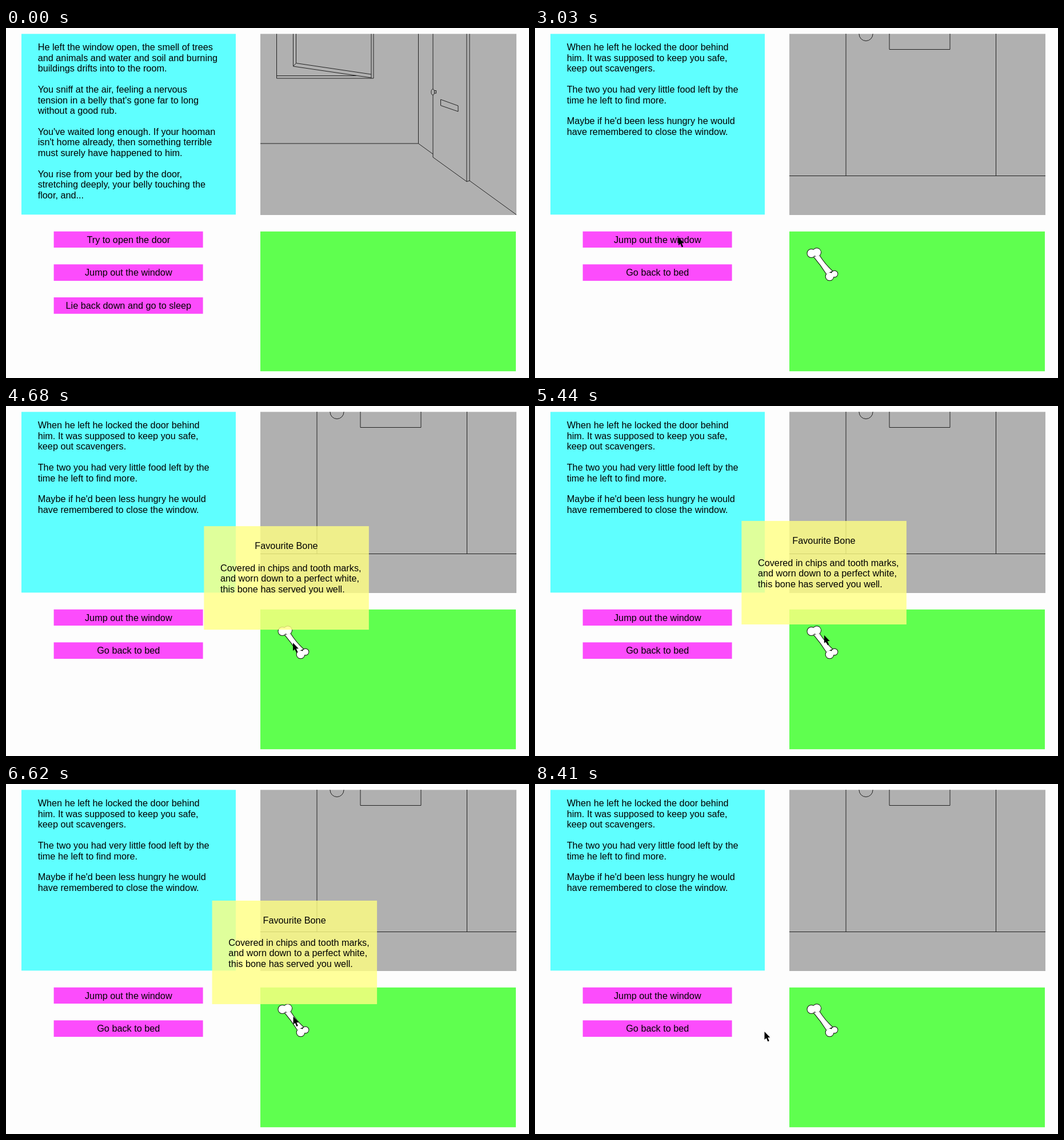
Write an HTML page that moves like this. It is 915 px wide and 612 px high and loops after 9.55 s.

```html
<!DOCTYPE html>
<html lang="en">
<head>
<meta charset="utf-8">
<title>Dog story</title>
<style>
html, body { margin: 0; width: 100%; height: 100%; overflow: hidden; background: #fdfdfd; }
svg { display: block; width: 100vw; height: 100vh; }
text { font: 16.25px "Liberation Sans", Arial, sans-serif; fill: #000; white-space: pre; }
.mid { text-anchor: middle; }
.line { fill: none; stroke: #222; stroke-width: 1; }
.btn { fill: #fc4cfc; }
</style>
</head>
<body>
<svg viewBox="0 0 915 612">
  <defs>
    <clipPath id="view"><rect x="445" y="10.3" width="448" height="316.7"/></clipPath>
    <g id="bone">
      <circle cx="483.5" cy="394" r="7"/>
      <circle cx="493" cy="392.3" r="7"/>
      <circle cx="515.5" cy="434.5" r="6.8"/>
      <circle cx="524" cy="430" r="5.3"/>
      <path d="M488 400Q500 414 510 430L520 425Q507 413 497.500 398Z"/>
    </g>
  </defs>

  <rect x="27" y="10.3" width="375" height="316" fill="#5fffff"/>
  <rect x="445" y="10.3" width="448" height="316.7" fill="#b0b0b0"/>
  <rect x="445" y="355.800" width="447" height="244.400" fill="#5fff4f"/>
  <rect class="btn" x="83.600" y="355.700" width="261" height="28.300"/>
  <rect class="btn" x="83.600" y="413.300" width="261" height="28.800"/>

  <g id="room">
    <rect class="btn" x="83.600" y="471" width="261" height="28.700"/>
    <g class="line" clip-path="url(#view)">
      <path d="M473.500 0V88H643V0M473.500 83.500H613M639 0V88"/>
      <path d="M502.500 0V67L507.500 61.500V0M507.500 61.500L639 81M502.500 67L639 87"/>
      <path d="M445 202H721.500V0M721.500 202L747 220.500"/>
      <path d="M747 0V226L806 268.500V0M806 268.500L811 267V0M811 267L893 326.500"/>
      <path d="M760.500 125L791 136V146L760.500 135.500Z"/>
      <rect x="749.500" y="109.500" width="3" height="4.500"/>
      <ellipse cx="746.700" cy="112" rx="2.800" ry="5" fill="#b0b0b0"/>
    </g>
  </g>

  <g id="door" opacity="0">
    <g class="line" clip-path="url(#view)">
      <path d="M544 0V258.500M806.500 0V258.500M445 258.500H893"/>
      <path d="M620 0V37.500H726V0"/>
      <circle cx="579" cy="10.500" r="12"/>
    </g>
    <use href="#bone" fill="#111" stroke="#111" stroke-width="2"/>
    <use href="#bone" fill="#fff"/>
  </g>

  <g id="tip" visibility="hidden">
    <rect width="288.500" height="181" fill="#ffff83" fill-opacity=".8"/>
  </g>
  <path id="cursor" d="M0 0V14L3.200 11.200L5.800 17.300L8.300 16.200L5.700 10.300H9.800Z"/>
</svg>

<script>
const LOOP = 9550, LAG = 33, LEADING = 18.46;
const $ = id => document.getElementById(id);

function addText(parent, str, x, y, cls = "") {
  const el = document.createElementNS("http://www.w3.org/2000/svg", "text");
  el.setAttribute("x", x);
  el.setAttribute("y", y);
  el.setAttribute("class", cls);
  el.textContent = str;
  parent.append(el);
}

function addLines(parent, lines, x, y) {
  lines.forEach((line, i) => line && addText(parent, line, x, y + i * LEADING));
}

function addScene(parent, story, choices) {
  addLines(parent, story, 55.7, 39.2);
  choices.forEach((c, i) => addText(parent, c, 214.3, 375.5 + i * 57.6, "mid"));
}

addScene($("room"), [
  "He left the window open, the smell of trees",
  "and animals and water and soil and burning",
  "buildings drifts into to the room.",
  "",
  "You sniff at the air, feeling a nervous",
  "tension in a belly that's gone far to long",
  "without a good rub.",
  "",
  "You've waited long enough. If your hooman",
  "isn't home already, then something terrible",
  "must surely have happened to him.",
  "",
  "You rise from your bed by the door,",
  "stretching deeply, your belly touching the",
  "floor, and..."
], ["Try to open the door", "Jump out the window", "Lie back down and go to sleep"]);

addScene($("door"), [
  "When he left he locked the door behind",
  "him. It was supposed to keep you safe,",
  "keep out scavengers.",
  "",
  "The two you had very little food left by the",
  "time he left to find more.",
  "",
  "Maybe if he'd been less hungry he would",
  "have remembered to close the window."
], ["Jump out the window", "Go back to bed"]);

addText($("tip"), "Favourite Bone", 144, 40.3, "mid");
addLines($("tip"), [
  "Covered in chips and tooth marks,",
  "and worn down to a perfect white,",
  "this bone has served you well."
], 28.6, 78.8);

const linear = p => p;
const out = p => 1 - (1 - p) ** 2;
const both = p => p * p * (3 - 2 * p);

// time, x, y, easing towards this point
const path = [
  [680, 887, 434], [1030, 526, 419, out],
  [1447, 526, 419], [1480, 519, 419], [1960, 251, 366, both],
  [3700, 251, 366], [3960, 309, 361, both],
  [4110, 309, 361], [4600, 482, 408], [4647, 490, 413.5],
  [4680, 502, 414], [4730, 504, 414, out],
  [5320, 504, 414], [5460, 506, 400, both],
  [5730, 506, 400], [6000, 506, 407], [6240, 509, 409, out],
  [6460, 509, 409], [6830, 493, 403, both],
  [7080, 493, 403], [7137, 491.5, 404], [7170, 475, 402],
  [7820, 398, 434, out], [8000, 398, 434], [8060, 399, 434],
  [8369, 399, 434], [8410, 401.5, 433]
];

function pointer(t) {
  const i = path.findIndex(k => k[0] > t);
  if (i < 0) return path.at(-1).slice(1, 3);
  if (i === 0) return path[0].slice(1, 3);
  const [t0, x0, y0] = path[i - 1];
  const [t1, x1, y1, ease = linear] = path[i];
  const p = ease((t - t0) / (t1 - t0));
  return [x0 + (x1 - x0) * p, y0 + (y1 - y0) * p];
}

function place(el, x, y, visible) {
  el.setAttribute("transform", `translate(${x.toFixed(2)} ${y.toFixed(2)})`);
  el.setAttribute("visibility", visible ? "visible" : "hidden");
}

function draw(t) {
  const fade = Math.min(1, Math.max(0, (t - 2480) / 550));
  $("room").setAttribute("opacity", 1 - fade);
  $("door").setAttribute("opacity", fade);

  const [x, y] = pointer(t);
  place($("cursor"), x, y, t >= 680);

  // The hint trails the pointer slightly
  const [hx, hy] = pointer(t - LAG);
  place($("tip"), hx - 144, hy - 203.4, t >= 4620 && t < 7230);
}

const start = performance.now();
function tick() {
  draw((performance.now() - start) % LOOP);
  requestAnimationFrame(tick);
}
tick();
</script>
</body>
</html>
```
